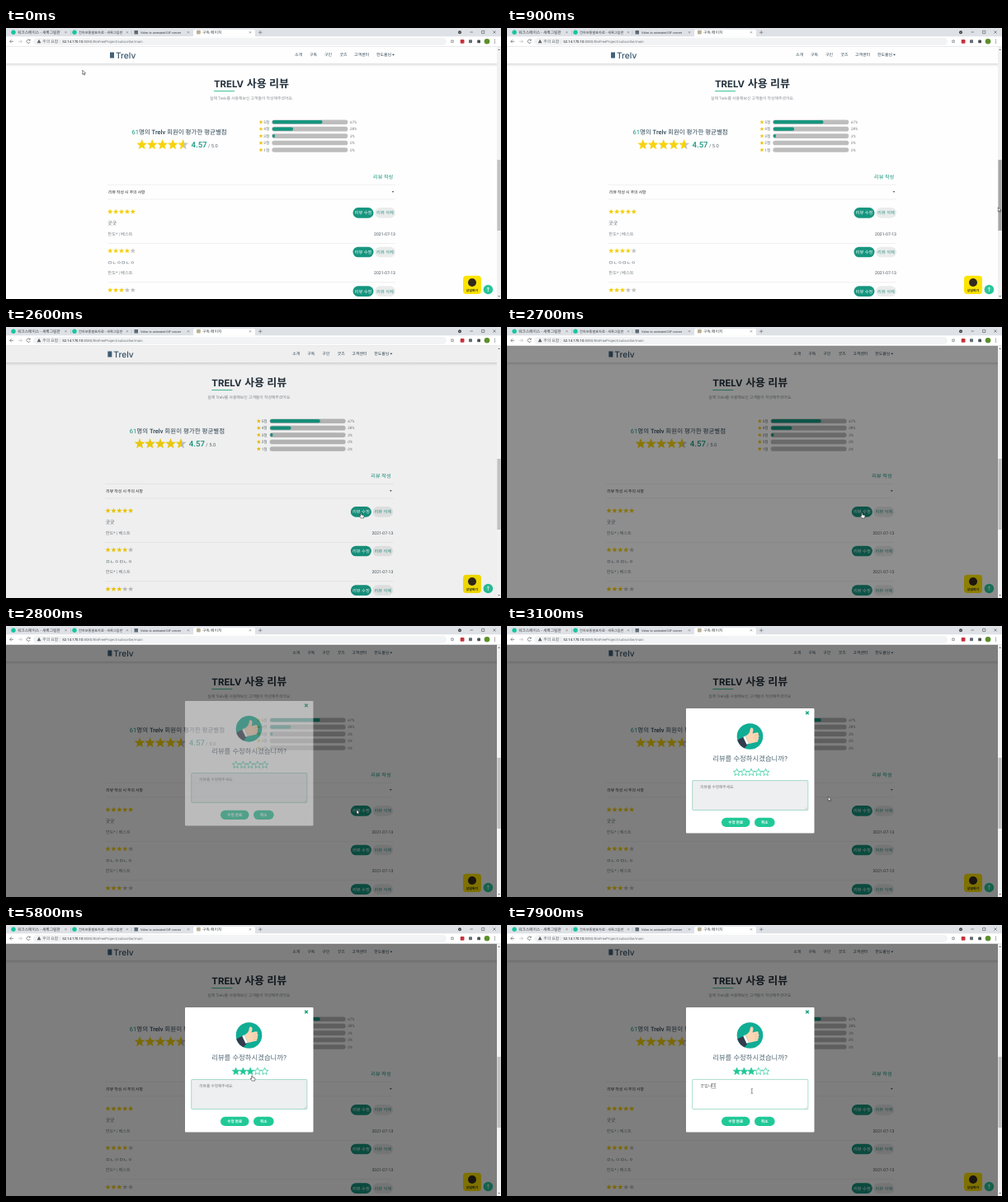
An HTML page for the animation above (8 s loop, 600 by 329 pixels).

```html
<!DOCTYPE html>
<html lang="ko">
<head>
<meta charset="utf-8">
<title>구독 페이지</title>
<style>
  html, body { margin: 0; width: 100%; height: 100%; overflow: hidden; background: #fff; }
  svg { display: block; width: 100vw; height: 100vh; }
  text {
    font-family: Roboto, "Noto Sans CJK KR", "Noto Sans CJK", sans-serif;
    text-rendering: geometricPrecision;
    white-space: pre;
  }
</style>
</head>
<body>
<svg id="stage" viewBox="0 0 600 329"></svg>
<script>
const LOOP = 8000;
const TEAL = '#16967f', GREEN = '#20c997', GOLD = '#f6d30d', GREY = '#c4c4c4', INK = '#2c4453';

const attrs = o => Object.entries(o).map(([k, v]) => ` ${k}="${v}"`).join('');
const text = (x, y, size, str, fill = INK, more = {}) =>
  `<text x="${x}" y="${y}" font-size="${size}" fill="${fill}"${attrs(more)}>${str}</text>`;
const rect = (x, y, w, h, fill, more = {}) =>
  `<rect x="${x}" y="${y}" width="${w}" height="${h}" fill="${fill}"${attrs(more)}/>`;
const circle = (x, y, r, fill, more = {}) =>
  `<circle cx="${x}" cy="${y}" r="${r}" fill="${fill}"${attrs(more)}/>`;
const path = (d, stroke, width = 0.7, more = {}) =>
  `<path d="${d}" fill="none" stroke="${stroke}" stroke-width="${width}"${attrs(more)}/>`;
const repeat = (n, fn) => Array.from({ length: n }, (_, i) => fn(i)).join('');
const MID = { 'text-anchor': 'middle' };
const BOLD = { 'font-weight': 700 };
const MEDIUM = { 'font-weight': 500 };

function star(cx, cy, r, fill, more = {}) {
  const points = Array.from({ length: 10 }, (_, i) => {
    const a = Math.PI * (i / 5 - 0.5), d = i % 2 ? r * 0.44 : r;
    return `${(cx + d * Math.cos(a)).toFixed(2)},${(cy + d * Math.sin(a)).toFixed(2)}`;
  });
  return `<polygon points="${points.join(' ')}" fill="${fill}"${attrs(more)}/>`;
}

const pill = (x, y, w, h, fill, label, color, size, more = {}) =>
  rect(x, y, w, h, fill, { rx: h / 2 }) +
  text(x + w / 2, y + h / 2 + size * 0.36, size, label, color, { ...MID, ...more });

const cross = (x, y, r, color, width) =>
  path(`M${x - r} ${y - r}l${2 * r} ${2 * r}m0 ${-2 * r}l${-2 * r} ${2 * r}`, color, width);

function browser() {
  const tab = (x, title, size, icon, closeX) =>
    icon + text(x, 7, size, title, '#3c4043') + cross(closeX, 5.3, 1.1, '#5f6368', 0.5);
  return rect(0, 0, 600, 10.5, '#dee1e6') +
    path('M227 10.5V4q0-2 2-2h71q2 0 2 2v6.5', 'none', 0, { style: 'fill:#fff' }) +
    tab(14, '워크스페이스 - 새록그림판', 4.75, circle(9, 5.2, 2.7, '#17c6a0'), 72.5) +
    tab(88, '전자보통발표자료 - 새록그림판', 4.2, circle(83, 5.2, 2.7, '#17c6a0'), 147) +
    tab(163, 'Video to animated GIF conver', 3.74, rect(155.5, 3, 4.5, 4.5, '#5d6873'), 221) +
    tab(238, '구독 페이지', 4.85, rect(231, 2.8, 4.8, 4.8, '#b9b098', { rx: 0.8 }), 296) +
    path('M78.5 3v5M152 3v5', '#9a9ea5', 0.4) +
    path('M306 5.3h4.4m-2.2-2.2v4.4', '#5f6368', 0.6) +
    circle(550, 5.2, 2, '#3c4043') + path('M549.2 4.9l.8.9.8-.9', '#fff', 0.5) +
    path('M562.5 5h3.4M576.6 3.4h3.2v3.2h-3.2z', '#333', 0.5) + cross(592, 5, 1.6, '#333', 0.5) +
    rect(0, 10.5, 600, 12, '#fff') +
    rect(33, 11.9, 501, 9, '#f1f3f4', { rx: 4.5 }) +
    path('M9 16.3H4.6m2-2l-2 2 2 2', '#5f6368') +
    path('M15 16.3h4.4m-2-2l2 2-2 2', '#babcbe') +
    path('M29 14.8a2.2 2.2 0 1 0 .3 2.2M29.2 13.6v1.6h-1.6', '#5f6368') +
    '<path d="M40 13.8l2.4 4.4h-4.8z" fill="#5f6368"/>' +
    text(44.3, 18.1, 4.8, '주의 요함', '#5f6368') + path('M65.3 14v5', '#c4c7ca', 0.4) +
    text(68.3, 18, 4.3, '<tspan fill="#202124">52.14.170.10</tspan>:8080/BinFreeProject/subscribe/main', '#70757a') +
    star(541, 16.3, 2.1, 'none', { stroke: '#5f6368', 'stroke-width': 0.5 }) +
    rect(550.7, 14, 4.8, 4.8, '#c8323c', { rx: 1 }) +
    rect(561, 14.3, 4, 4, '#666c74', { rx: 0.8 }) +
    rect(571.2, 14.5, 3.8, 3.8, '#4c5055', { rx: 0.9 }) +
    circle(583, 16.3, 3.3, '#5c8f2a') +
    repeat(3, i => circle(592.5, 14.5 + i * 1.8, 0.55, '#5f6368')) +
    rect(0, 22.3, 600, 0.5, '#d5d7da');
}

function navigation() {
  const items = [[350, '소개'], [368, '구독'], [386, '구인'], [404.5, '굿즈'], [422, '고객센터'], [449, '한도율님']];
  return rect(-5, 22.8, 610, 20.2, '#fefefe') +
    rect(-5, 43, 610, 4, 'url(#shade)') +
    rect(126, 29.5, 5, 7, '#41617a') +
    text(133, 36.6, 10.2, 'Trelv', '#34536b', { 'font-weight': 500, style: 'font-family:Inter,sans-serif' }) +
    items.map(([x, label]) => text(x, 34.3, 4.9, label)).join('') +
    `<path d="M468 31.8h3l-1.5 1.7z" fill="${INK}"/>`;
}

function summary() {
  const shares = [67, 28, 3, 0, 0];
  return text(252, 72.2, 11.4, 'TRELV', '#24313c', { ...BOLD, style: 'font-family:Inter,sans-serif' }) +
    text(291.8, 72.2, 13, '사용 리뷰', '#24313c', BOLD) +
    rect(252, 76.1, 25, 1, '#3cc09a') +
    text(297.5, 87, 4.85, '실제 Trelv를 사용해보신 고객들이 작성해주셨어요.', '#858b90', MID) +
    text(152.5, 128.8, 7.5, `<tspan fill="${TEAL}" font-weight="400">61</tspan>명의 Trelv 회원이 평가한 평균별점`, INK, MEDIUM) +
    repeat(5, i => star(164.7 + i * 12.5, 141.8, 6.7, i < 4 ? GOLD : 'url(#part)')) +
    text(224.5, 145.4, 9.6, '4.57', TEAL, MEDIUM) +
    text(245, 145.2, 5.8, '/ 5.0', '#5e6870') +
    shares.map((share, i) => {
      const y = 114.2 + i * 8.45;
      return star(309, y, 2.7, '#efc51c') +
        text(312.3, y + 1.7, 4.7, `${5 - i}점`, '#66707a') +
        rect(322.3, y - 2.8, 92, 5.6, '#bdbdbd', { rx: 2.8 }) +
        (share ? rect(322.8, y - 2.1, Math.max(3.3, share * 0.905), 4.2, TEAL, { rx: Math.min(2.1, share) }) : '') +
        text(417, y + 1.6, 4.6, `${share}%`, '#777', { 'font-style': 'italic' });
    }).join('');
}

function review(i, score, body) {
  const y = i * 47.6;
  return repeat(5, k => star(126.2 + k * 6.9, 223 + y, 3.3, k < score ? '#f4cf12' : GREY)) +
    pill(420.5, 218.1 + y, 25, 12.6, TEAL, '리뷰 수정', '#fff', 5.3) +
    pill(447, 218.1 + y, 25, 12.6, '#eaecec', '리뷰 삭제', '#3a9687', 5.3) +
    text(123.3, 239.2 + y, 5.9, body, '#52626e') +
    text(123.3, 251.8 + y, 5.25, '한도* | 베스트', '#7b8288') +
    text(472, 251.8 + y, 5.15, '2021-07-13', '#4d565e', { 'text-anchor': 'end' }) +
    rect(123, 261 + y, 349, 0.5, '#e2e2e2');
}

function reviews() {
  return text(445, 183, 6.2, '리뷰 작성', TEAL) +
    rect(123, 190, 349, 0.5, '#e2e2e2') +
    text(124, 200.6, 4.8, '리뷰 작성 시 주의 사항', '#222', MEDIUM) +
    '<path d="M467.6 198.2h2.8l-1.4 1.6z" fill="#333"/>' +
    rect(123, 207.7, 349, 0.5, '#e2e2e2') +
    review(0, 5, '굿굿') + review(1, 4, 'ㅁㄴㅇㅁㄴㅇ') + review(2, 3, '');
}

function floating() {
  return rect(554, 300.8, 22, 22.2, '#fde400', { rx: 4 }) +
    circle(565, 309, 5, '#33281c') +
    text(565, 319.9, 3.9, '상담하기', '#222', { ...MID, ...BOLD }) +
    circle(584.4, 317.5, 5.8, '#29c59a') +
    path('M584.4 320v-5m-1.7 1.7l1.7-1.7 1.7 1.7', '#fff', 0.7);
}

function thumb() {
  return circle(294.5, 134, 15.8, '#10ad95') +
    '<g clip-path="url(#disc)">' +
    '<path d="M278 139l10-5 4.5 9-6 7h-10z" fill="#333c4e"/>' +
    '<path d="M286.2 134.8l2.6-1.4 4.4 9.2-2.6 1.5z" fill="#fff"/>' +
    '</g>' +
    '<path d="M289 133.6c4-2.2 5.200-4.300 5.800-8.400.4-2.600 3.500-2.300 3.700.6.100 1.800-.4 3.300-1.100 4.700l5.300-1.200c2.200-.4 2.900 1.900 1.500 2.800 1.700.4 1.700 2.600.3 3.200 1.200.8.9 2.500-.5 2.900.9 1 .2 2.300-1.200 2.600l-9.400 2.100z" fill="#fbd6b5"/>' +
    path('M299.500 133.400l4-.9M300 136.400l4-.9M300.400 139.100l3-.7', '#e0aa83', 0.45);
}

function modal() {
  return rect(217, 100, 155.5, 151.6, '#fff', { rx: 1 }) +
    cross(364, 105.5, 1.8, '#15a57d', 1.5) + thumb() +
    text(294.6, 164.2, 8.4, '리뷰를 수정하시겠습니까?', '#526875', MID) +
    repeat(5, i => star(278.6 + i * 8.75, 177.8, 4.6, '#fff',
      { class: 'score', stroke: GREEN, 'stroke-width': 0.7 })) +
    rect(224.7, 187.6, 140.2, 35.9, '#edeff1', { id: 'field', rx: 0.8, stroke: '#72c7ad', 'stroke-width': 0.6 }) +
    path('M364 220.500l-3 2.500m3-1l-1 1', '#999', 0.3) +
    text(234.3, 197.2, 4.7, '', '#777', { id: 'entry' }) +
    rect(0, 192.600, 4.900, 5.800, 'none', { id: 'compose', stroke: '#555', 'stroke-width': 0.35 }) +
    pill(260, 232.8, 34.5, 11.2, GREEN, '수정 완료', '#fff', 4.6, BOLD) +
    pill(300, 232.8, 24.6, 11.2, GREEN, '취소', '#fff', 4.6, BOLD);
}

function scrollbar() {
  return rect(595, 22.8, 5, 307, '#f1f1f1') +
    rect(595.4, 160, 4.3, 86, '#c1c1c1', { id: 'thumb' }) +
    '<path d="M596.300 27l1.300-1.500 1.300 1.500zM596.300 325l1.300 1.500 1.300-1.500z" fill="#666"/>';
}

function cursors() {
  const line = 'stroke="#111" stroke-width=".5" stroke-linejoin="round"';
  return `<g id="cursor">
    <path id="arrow" d="M0 0v5.200l1.200-1.100.8 1.800.9-.4-.8-1.800h1.600z" fill="#fff" ${line}/>
    <path id="hand" d="M-.6.400q.6-.8 1.200 0v2l2.600.6q.6.3.5 1l-.5 2.500h-3.300l-1.900-2.300q-.2-.9.700-.7l.7.600z" fill="#fff" ${line}/>
    <path id="beam" d="M-1.200-2.800h.8l.4.400.4-.4h.8M0-2.400v4.800M-1.200 2.800h.8l.4-.4.4.4h.8" fill="none" stroke="#222" stroke-width=".5"/>
  </g>`;
}

const stage = document.getElementById('stage');
stage.innerHTML = `<defs>
    <linearGradient id="shade" x2="0" y2="1">
      <stop stop-color="#000" stop-opacity=".13"/><stop offset="1" stop-color="#000" stop-opacity="0"/>
    </linearGradient>
    <linearGradient id="part">
      <stop offset=".57" stop-color="${GOLD}"/><stop offset=".57" stop-color="${GREY}"/>
    </linearGradient>
    <clipPath id="disc">${circle(294.5, 134, 15.8, '#000')}</clipPath>
  </defs>
  ${rect(0, 0, 600, 329, '#fefefe')}
  <g id="page">${navigation()}${summary()}${reviews()}</g>
  ${floating()}
  ${rect(0, 22.6, 595, 307, '#000', { id: 'backdrop' })}
  <g id="modal">${modal()}</g>
  ${scrollbar()}${browser()}${cursors()}`;

const el = Object.fromEntries([...stage.querySelectorAll('[id]')].map(n => [n.id, n]));
const scores = [...stage.querySelectorAll('.score')];

const clamp = v => Math.min(1, Math.max(0, v));
const ramp = (t, from, to) => clamp((t - from) / (to - from));
const smooth = v => v * v * (3 - 2 * v);

// time, x, y of the pointer tip
const route = [
  [100, 92.8, 51.2], [800, 595.3, 217.800], [1750, 595.3, 217.800], [2350, 430.3, 225.5],
  [2720, 430.3, 225.5], [3080, 389.3, 207.3], [3500, 389.3, 207.3], [4250, 298.3, 182.7],
  [5900, 298.3, 182.7], [6300, 296.8, 201.6]
];

function pointer(t) {
  const next = route.findIndex(p => p[0] > t);
  if (next === 0) return route[0].slice(1);
  if (next < 0) return route[route.length - 1].slice(1);
  const [a, b] = [route[next - 1], route[next]];
  const k = smooth(ramp(t, a[0], b[0]));
  return [a[1] + (b[1] - a[1]) * k, a[2] + (b[2] - a[2]) * k];
}

const typed = ['ㄱ', '구', '굿', '굿ㅇ', '굿이', '굿입', '굿입ㄴ', '굿입니', '굿입닏', '굿입니다'];
const OPEN = 2586, FOCUS = 6400, TYPE = 6750, KEY = 110;

function draw(t) {
  el.page.setAttribute('transform', `translate(${t < OPEN ? 0 : -2.65} 0)`);
  el.backdrop.setAttribute('opacity', 0.5 * ramp(t, OPEN, OPEN + 130));

  const drop = 1 - (1 - ramp(t, 2730, 3030)) ** 2;
  el.modal.setAttribute('opacity', ramp(t, 2730, 2880));
  el.modal.setAttribute('transform', `translate(0 ${-15.6 * (1 - drop)})`);

  const [x, y] = pointer(t);
  el.cursor.setAttribute('transform', `translate(${x} ${y})`);
  const overButton = t < 2750 && x > 420 && x < 446 && y > 218;
  const overStars = t > 3500 && x < 319 && y > 172 && y < 184.500;
  const overField = t > 3500 && x < 365 && y > 187.500;
  const shape = overButton || overStars ? 'hand' : overField ? 'beam' : 'arrow';
  for (const id of ['arrow', 'hand', 'beam'])
    el[id].setAttribute('visibility', id === shape ? 'visible' : 'hidden');
  el.thumb.setAttribute('fill', x > 594.500 ? '#a8a8a8' : '#c1c1c1');

  const lit = t >= 4250 ? 3 : 0;
  scores.forEach((s, i) => s.setAttribute('fill', i < lit ? GREEN : '#fff'));

  el.field.setAttribute('fill', t < FOCUS ? '#edeff1' : '#fff');
  const step = Math.min(typed.length - 1, Math.floor((t - TYPE) / KEY));
  const word = typed[step];
  el.entry.textContent = word || '리뷰를 수정해주세요.';
  el.entry.setAttribute('font-size', word ? 5 : 4.7);
  el.entry.setAttribute('fill', word ? '#555' : '#777');
  el.compose.setAttribute('visibility', word ? 'visible' : 'hidden');
  if (word) el.compose.setAttribute('x', 234.2 + (word.length - 1) * 4.6);
}

const start = performance.now();
function frame() {
  draw((performance.now() - start) % LOOP);
  requestAnimationFrame(frame);
}
frame();
</script>
</body>
</html>
```
